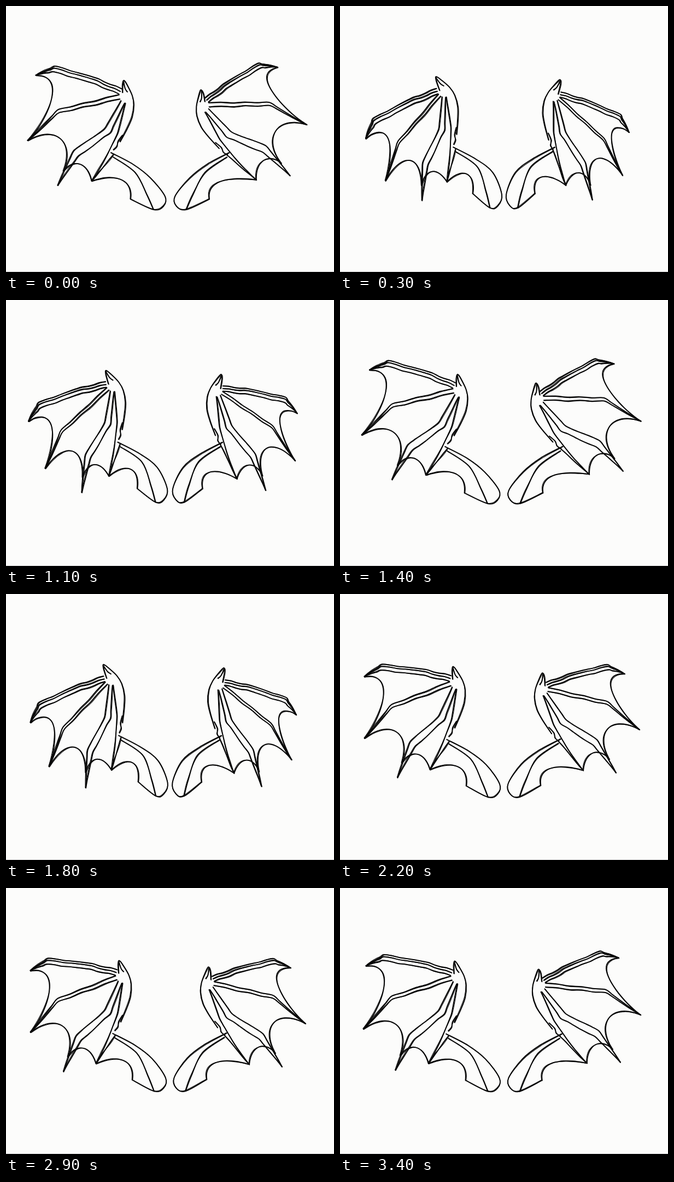
Animation of 600 by 486 pixels, one loop 3.5 s. Source, as an HTML page with a canvas:

```html
<!DOCTYPE html>
<html lang="en">
<head>
<meta charset="utf-8">
<title>Flapping wings</title>
<style>
html, body { margin: 0; width: 100%; height: 100%; overflow: hidden; background: #fcfcfb; }
canvas { display: block; }
</style>
</head>
<body>
<canvas id="stage" width="600" height="486"></canvas>
<script>
const ctx = document.getElementById('stage').getContext('2d');
const LOOP = 3500, STEP = 100, BEAT = 700;

// Joints of the raised wing; everything else hangs on them.
const HUB = [222, 163], ELBOW = [196, 272], FOOT = [285, 365];
const CORNER = [228, 353], NOTCH = [105, 302];

// Each finger runs from the hub to its tip; gaps place its parallel lines.
const fingers = [
  { path: [[160, 130], [90, 110], [55, 127]], gaps: [0, 4, 11] },
  { path: [[96, 189], [40, 246]], gaps: [0, 6] },
  { path: [[180, 224], [124, 265], [95, 328]], gaps: [0, 13] },
  { path: [[204, 232], [180, 282], [157, 320]], gaps: [0] }
];
const tips = fingers.map(f => f.path[f.path.length - 1]);

// Scalloped skin between the tips, as cubic curves.
const scallops = [
  [tips[0], [110, 125], [80, 205], tips[1]],
  [tips[1], [90, 215], [128, 250], NOTCH],
  [NOTCH, [122, 278], [150, 285], tips[3]]
];
const horn = [[213, 158], [213, 143], [216, 136], [223, 147], [231, 164], [234, 181], [231, 203], [222, 224], [209, 248]];
const hornInner = [[215, 139], [218, 151], [222, 157]];
const knuckle = [[213, 236], [205, 247], [203, 257], [197, 263]];
const limb = [[192, 268], [232, 289], [264, 314], [291, 348], [288, 366], [270, 372], CORNER];
const limbInner = [[196, 276], [236, 304], [258, 345], [270, 372]];

const wings = [
  { mirror: false, tilt: 0, swing: 1, shrink: 0, lead: 0, ease: 1 },
  { mirror: true, tilt: 14, swing: 1.2, shrink: 0.085, lead: 10, ease: 0.85 }
];

const clamp = (v, lo, hi) => Math.min(hi, Math.max(lo, v));
const mix = (a, b, k) => [a[0] + (b[0] - a[0]) * k, a[1] + (b[1] - a[1]) * k];
const sub = (a, b) => [a[0] - b[0], a[1] - b[1]];
const rad = deg => deg * Math.PI / 180;

// Turns v towards the outside of the wing for negative angles.
function turn(v, deg) {
  const c = Math.cos(rad(deg)), s = Math.sin(rad(deg));
  return [v[0] * c - v[1] * s, v[0] * s + v[1] * c];
}

function bezier(a, b, c, d, n = 14) {
  return Array.from({ length: n + 1 }, (_, i) => {
    const t = i / n, ab = mix(a, b, t), bc = mix(b, c, t), cd = mix(c, d, t);
    return mix(mix(ab, bc, t), mix(bc, cd, t), t);
  });
}

// Splits straight runs into slightly shaky ones.
function shaky(path, n = 5) {
  const out = [path[0]];
  for (let i = 1; i < path.length; i++) {
    for (let j = 1; j <= n; j++) {
      const p = mix(path[i - 1], path[i], j / n);
      out.push(j < n ? [p[0], p[1] + 0.9 * Math.sin(p[0] * 0.17 + p[1] * 0.1)] : p);
    }
  }
  return out;
}

// The finger's line number i, pushed sideways off its path.
function fingerLine({ path, gaps }, i) {
  const shift = (p, along, side) => {
    const v = sub(p, HUB), len = Math.hypot(...v), d = [v[0] / len, v[1] / len];
    const base = along === null ? p : [HUB[0] + d[0] * along, HUB[1] + d[1] * along];
    return [base[0] + d[1] * side, base[1] - d[0] * side];
  };
  const root = shift(path[0], 15, -8 + 16 * (i + 0.5) / gaps.length);
  const inner = path.slice(0, -1).map(p => shift(p, null, gaps[i]));
  return shaky([root, ...inner, path[path.length - 1]]);
}

// Pose of one wing: s = 0 raised, 1 lowered.
function rig({ mirror, tilt, swing, shrink }, s) {
  const flip = p => mirror ? [600 - p[0], p[1]] : p;
  const arm = p => {
    const k = s * Math.min(1, Math.hypot(...sub(p, FOOT)) / 55);
    return [p[0] + 15 * k, p[1] - 10 * k];
  };
  const angle = tilt - 23 * swing * s;
  const up = turn(sub(HUB, ELBOW), angle).map(v => v * (1 - shrink));
  const elbow = arm(ELBOW), hub = [elbow[0] + up[0], elbow[1] + up[1]];
  // Outer fingers fold further than inner ones
  const wing = p => {
    const v = sub(p, HUB);
    const a = Math.atan2(-v[1], -v[0]) * 180 / Math.PI;
    const k = a > 60 ? 0 : clamp((a + 75) / 87, 0, 1) ** 1.5;
    const q = turn(v, angle - 21 * swing * s * k).map(c => c * (1 - shrink * k * k));
    return [hub[0] + q[0], hub[1] + q[1]];
  };
  return { arm, wing, flip };
}

function curve(pts, width) {
  ctx.lineWidth = width;
  ctx.beginPath();
  ctx.moveTo(...pts[0]);
  for (let i = 0; i < pts.length - 1; i++) {
    const a = pts[i - 1] || pts[i], b = pts[i], c = pts[i + 1], d = pts[i + 2] || c;
    ctx.bezierCurveTo(
      b[0] + (c[0] - a[0]) / 6, b[1] + (c[1] - a[1]) / 6,
      c[0] - (d[0] - b[0]) / 6, c[1] - (d[1] - b[1]) / 6, c[0], c[1]);
  }
  ctx.stroke();
}

// A firm pen line and a loose thin one beside it.
function ink(pts) {
  curve(pts, 2);
  const n = pts.length - 1;
  curve(pts.map(([x, y], i) => {
    const w = 1.5 * Math.sin(i / n * 5 + 0.6);
    return [x + w, y + w * 0.7];
  }), 1.1);
}

function drawWing(w, s) {
  const { arm, wing, flip } = rig(w, s);
  const pen = (pts, place) => ink(pts.map(place).map(flip));

  fingers.forEach(f => f.gaps.forEach((_, i) => pen(fingerLine(f, i), wing)));
  scallops.forEach(c => pen(bezier(...c), wing));
  [horn, hornInner, knuckle].forEach(p => pen(p, wing));
  [limb, limbInner].forEach(p => pen(p, arm));

  const heel = wing(tips[3]);
  pen(shaky([arm(ELBOW), heel]), p => p);
  pen(bezier(heel, wing([195, 305]), arm([234, 315]), arm(CORNER)), p => p);
}

// Steady beat that runs a little early in the first half of the loop.
function lowered(t, { lead, ease }) {
  const early = 0.015 + 0.06 * Math.sin(Math.PI * Math.min(1, t / 1750));
  const phase = (t + lead) / BEAT + early;
  const s = 0.5 - 0.515 * Math.cos(phase * 2 * Math.PI);
  return Math.max(0, s) ** ease;
}

function draw(t) {
  ctx.fillStyle = '#fcfcfb';
  ctx.fillRect(0, 0, 600, 486);
  ctx.fillStyle = '#c9c9c9';
  ctx.fillRect(0, 485, 600, 1);
  ctx.strokeStyle = '#050505';
  ctx.lineCap = ctx.lineJoin = 'round';
  wings.forEach(w => drawWing(w, lowered(t, w)));
}

const start = performance.now();
let shown = -1;
function tick() {
  const t = Math.floor((performance.now() - start) % LOOP / STEP) * STEP;
  if (t !== shown) draw(shown = t);
  requestAnimationFrame(tick);
}
tick();
</script>
</body>
</html>
```
